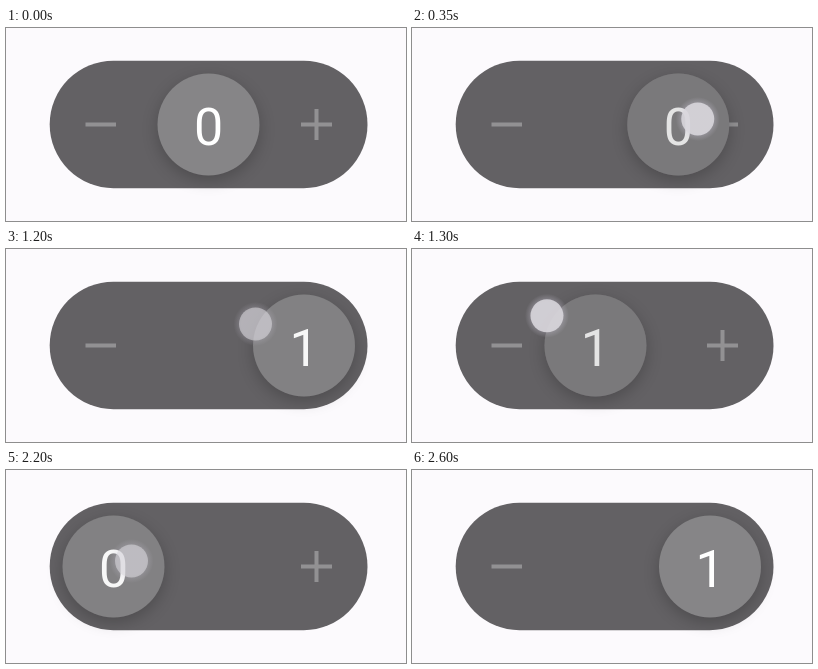
An HTML page with a canvas for the animation above (3.2 s loop, 400 by 193 pixels).

```html
<!DOCTYPE html>
<html lang="en">
<head>
<meta charset="utf-8">
<title>Slide stepper</title>
<style>
  html, body { margin: 0; width: 100%; height: 100%; overflow: hidden; background: #fcfafd; }
  canvas { display: block; width: 400px; height: 193px; }
</style>
</head>
<body>
<canvas id="stage"></canvas>
<script>
const LOOP = 3200, STEP = 50;
const MID = 202.5, LEFT = 107.5, RIGHT = 298, CY = 96.5;
const PAGE = '#fcfafd', TRACK = '#636164', KNOB = '#868587', SIGN = '#929193';

const canvas = document.getElementById('stage');
const ctx = canvas.getContext('2d');
const scale = window.devicePixelRatio || 1;
canvas.width = 400 * scale;
canvas.height = 193 * scale;

const clamp = (v, lo, hi) => Math.min(hi, Math.max(lo, v));
const mix = (a, b, p) => a + (b - a) * p;
const easeInOut = p => p * p * (3 - 2 * p);
const easeOut = p => 1 - (1 - p) ** 3;

// The finger swipes from `grab` beside the resting knob to `end`.
const drags = [
  { at: 200, ms: 350, ease: easeInOut, rest: MID, grab: 19.5, end: 384, y: [91, 91], value: 0 },
  { at: 1200, ms: 390, ease: easeOut, rest: RIGHT, grab: -48.5, end: 55, y: [75, 61], value: 1 },
  { at: 2200, ms: 300, ease: easeOut, rest: LEFT, grab: 18, end: 339, y: [91, 87], value: 0 }
];

function pose(t) {
  const drag = drags.filter(d => d.at <= t).pop();
  if (!drag) return { x: MID, value: 0, press: 0 };
  const dt = t - drag.at;
  const p = drag.ease(Math.min(1, dt / drag.ms));
  const fx = mix(drag.rest + drag.grab, drag.end, p);
  const x = clamp(fx - drag.grab, LEFT, RIGHT);
  const goal = drag.end > drag.rest ? RIGHT : LEFT;
  return {
    x, fx,
    fy: mix(...drag.y, p),
    value: x === goal ? 1 - drag.value : drag.value,
    press: clamp(Math.min((dt + 50) / 150, (drag.ms - dt) / 150), 0, 1)
  };
}

function disc(x, y, r, fill) {
  ctx.beginPath();
  ctx.arc(x, y, r, 0, Math.PI * 2);
  ctx.fillStyle = fill;
  ctx.fill();
}

function drawTrack() {
  ctx.fillStyle = TRACK;
  ctx.beginPath();
  ctx.roundRect(43.7, 32.7, 317.8, 127.5, 63.75);
  ctx.fill();
  ctx.fillStyle = SIGN;
  ctx.fillRect(79.5, 94.5, 30.5, 4);
  ctx.fillRect(295, 94.5, 31, 4);
  ctx.fillRect(308.5, 81, 4, 31);
}

function drawKnob({ x, value, press }) {
  ctx.save();
  ctx.shadowColor = 'rgba(0,0,0,.22)';
  ctx.shadowBlur = 16 * scale;
  ctx.shadowOffsetY = 5 * scale;
  disc(x, CY, 51, KNOB);
  ctx.restore();
  disc(x, CY, 51, `rgba(99,97,100,${0.34 * press})`);
  ctx.fillStyle = `rgba(255,255,255,${1 - 0.2 * press})`;
  ctx.font = '400 52px Roboto, sans-serif';
  ctx.textAlign = 'center';
  ctx.fillText(value, x, 117);
}

function drawFinger({ fx, fy, press }) {
  ctx.save();
  ctx.globalAlpha = Math.min(1, press * 2);
  const glow = ctx.createRadialGradient(fx, fy, 14, fx, fy, 22);
  glow.addColorStop(0, 'rgba(205,200,216,.4)');
  glow.addColorStop(1, 'rgba(205,200,216,0)');
  disc(fx, fy, 22, glow);
  disc(fx, fy, 16.5, 'rgba(218,216,221,.88)');
  ctx.restore();
}

function draw(t) {
  const p = pose(t);
  ctx.setTransform(scale, 0, 0, scale, 0, 0);
  ctx.fillStyle = PAGE;
  ctx.fillRect(0, 0, 400, 193);
  drawTrack();
  drawKnob(p);
  if (p.press > 0) drawFinger(p);
}

const start = performance.now();
function tick() {
  const t = (performance.now() - start) % LOOP;
  draw(Math.floor(t / STEP) * STEP);
  requestAnimationFrame(tick);
}
tick();
</script>
</body>
</html>
```
